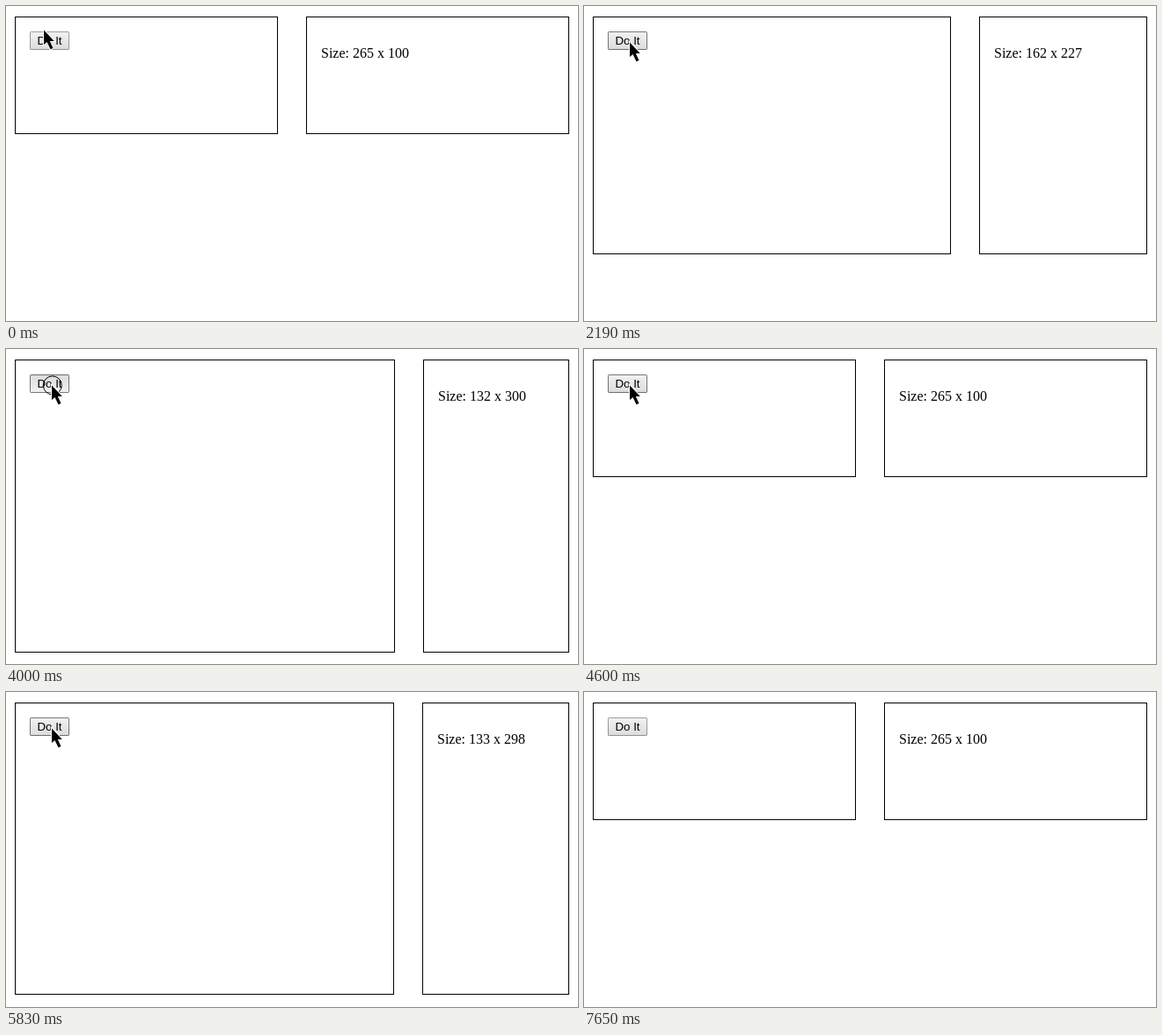
Write an HTML page with a canvas that moves like this. It is 650 by 359 pixels and loops after 8.58 s.

```html
<!DOCTYPE html>
<html lang="en">
<head>
<meta charset="utf-8">
<title>Resizing panels</title>
<style>
  html, body { margin: 0; width: 100%; height: 100%; overflow: hidden; background: #fff; }
  canvas { display: block; }
</style>
</head>
<body>
<canvas id="stage" width="650" height="359"></canvas>
<script>
const ctx = document.getElementById('stage').getContext('2d', { alpha: false });
const LOOP = 8580;
const STEP = 30;
const DURATION = 500;
const TEXT_LAG = 16.7;
const BUTTON = { x: 27, y: 29, w: 45, h: 21 };

// press: mouse down, start: mouse up and transition start, tick: phase of the sampling grid
const CLICKS = [
  { press: 1930, start: 1989, tick: 2190, end: 2470, grow: true },
  { press: 4000, start: 4092, tick: 4600, end: 4600, grow: false },
  { press: 5250, start: 5377, tick: 5830, end: 5920, grow: true },
  { press: 6730, start: 6848, tick: 6930, end: 7380, grow: false }
];

// time, x, y, acceleration power of the move towards the point
const PATH = [
  [0, 42, 26], [29, 42, 26], [30, 45, 26],
  [150, 45, 26], [390, 44, 31],
  [1160, 44, 31], [1320, 44, 36],
  [1480, 44, 36], [1650, 51, 40],
  [6319, 51, 40], [6320, 52, 40],
  [7360, 52, 40], [7570, 146, 230, 1.6], [7630, 196, 302]
];
const POINTER_GONE = 7650;

const ARROW = [[1, 1.5], [1, 18], [4.5, 15], [8.5, 23.3], [11.5, 22], [7.8, 14], [12.8, 14]];

const snap = (t, phase) => phase + Math.floor((t - phase) / STEP) * STEP;

// CSS "ease": cubic-bezier(.25, .1, .25, 1)
function ease(x) {
  if (x <= 0) return 0;
  if (x >= 1) return 1;
  let lo = 0, hi = 1;
  for (let i = 0; i < 30; i++) {
    const s = (lo + hi) / 2;
    if (0.75 * s * (1 - s) + s ** 3 < x) lo = s; else hi = s;
  }
  const r = 1 - lo;
  return 0.3 * lo * r * r + 3 * lo * lo * r + lo ** 3;
}

// 0 = small layout, 1 = expanded layout
function expansion(t, lag) {
  const click = CLICKS.filter(c => t >= c.press).pop();
  if (!click) return 0;
  const p = t >= click.end ? 1 : ease((snap(t, click.tick) - lag - click.start) / DURATION);
  return click.grow ? p : 1 - p;
}

function layout(p) {
  const side = 530 / (2 + 2 * p);
  return { main: 530 - side, side, height: 100 + 200 * p };
}

function pointerAt(t) {
  if (t >= POINTER_GONE) return null;
  const i = PATH.findIndex(k => k[0] > t);
  if (i < 0) {
    const last = PATH[PATH.length - 1];
    return { x: last[1], y: last[2] };
  }
  const [t0, x0, y0] = PATH[i - 1];
  const [t1, x1, y1, power = 1] = PATH[i];
  const u = Math.max(0, (snap(t, t1) - t0) / (t1 - t0)) ** power;
  return { x: Math.round(x0 + (x1 - x0) * u), y: Math.round(y0 + (y1 - y0) * u) };
}

function frameRect(left, top, right, bottom, color) {
  ctx.strokeStyle = color;
  ctx.lineWidth = 1;
  ctx.strokeRect(left + 0.5, top + 0.5, right - left - 1, bottom - top - 1);
}

function label(text, x, y, font, align) {
  ctx.font = font;
  ctx.textAlign = align;
  ctx.fillStyle = '#000';
  ctx.fillText(text, x, y);
}

function drawPanels(t) {
  const box = layout(expansion(t, 0));
  const shown = layout(expansion(t, TEXT_LAG));
  const split = 10 + box.main + 34;
  const bottom = Math.round(12 + box.height + 34);
  frameRect(10, 12, Math.round(split), bottom, '#000');
  frameRect(Math.round(split + 32), 12, 640, bottom, '#000');
  label(`Size: ${Math.floor(shown.side)} x ${Math.floor(shown.height)}`,
    Math.round(split + 49), 59, '16px "Liberation Serif", "Times New Roman", serif', 'left');
}

function drawButton(hover, pressed) {
  const { x, y, w, h } = BUTTON;
  const shade = ctx.createLinearGradient(0, y, 0, y + h);
  shade.addColorStop(pressed ? 1 : 0, '#f2f2f2');
  shade.addColorStop(pressed ? 0 : 1, '#dcdcdc');
  ctx.fillStyle = shade;
  ctx.beginPath();
  ctx.roundRect(x, y, w, h, 1);
  ctx.fill();
  ctx.strokeStyle = `rgba(0,0,0,${hover ? 0.5 : 0.34})`;
  ctx.lineWidth = 1;
  ctx.beginPath();
  ctx.roundRect(x + 0.5, y + 0.5, w - 1, h - 1, 1);
  ctx.stroke();
  label('Do It', x + w / 2, 44, '13.333px "Liberation Sans", Arial, sans-serif', 'center');
}

function drawPointer({ x, y }, pressed) {
  if (pressed) {
    ctx.strokeStyle = '#000';
    ctx.lineWidth = 1;
    ctx.beginPath();
    ctx.arc(x + 1.8, y + 1.4, 10.5, 0, Math.PI * 2);
    ctx.stroke();
  }
  ctx.beginPath();
  for (const [dx, dy] of ARROW) ctx.lineTo(x + dx, y + dy);
  ctx.closePath();
  ctx.strokeStyle = '#fff';
  ctx.lineWidth = 2;
  ctx.stroke();
  ctx.fillStyle = '#000';
  ctx.fill();
}

function draw(t) {
  const pointer = pointerAt(t);
  const pressed = CLICKS.some(c => t >= c.press && t < c.start);
  const { x, y, w, h } = BUTTON;
  const hover = !!pointer && pointer.x >= x && pointer.x < x + w && pointer.y >= y && pointer.y < y + h;
  ctx.fillStyle = '#fff';
  ctx.fillRect(0, 0, 650, 359);
  drawPanels(t);
  drawButton(hover, pressed);
  if (pointer) drawPointer(pointer, pressed);
}

const origin = performance.now();
function tick() {
  draw((performance.now() - origin) % LOOP);
  requestAnimationFrame(tick);
}
tick();
</script>
</body>
</html>
```
